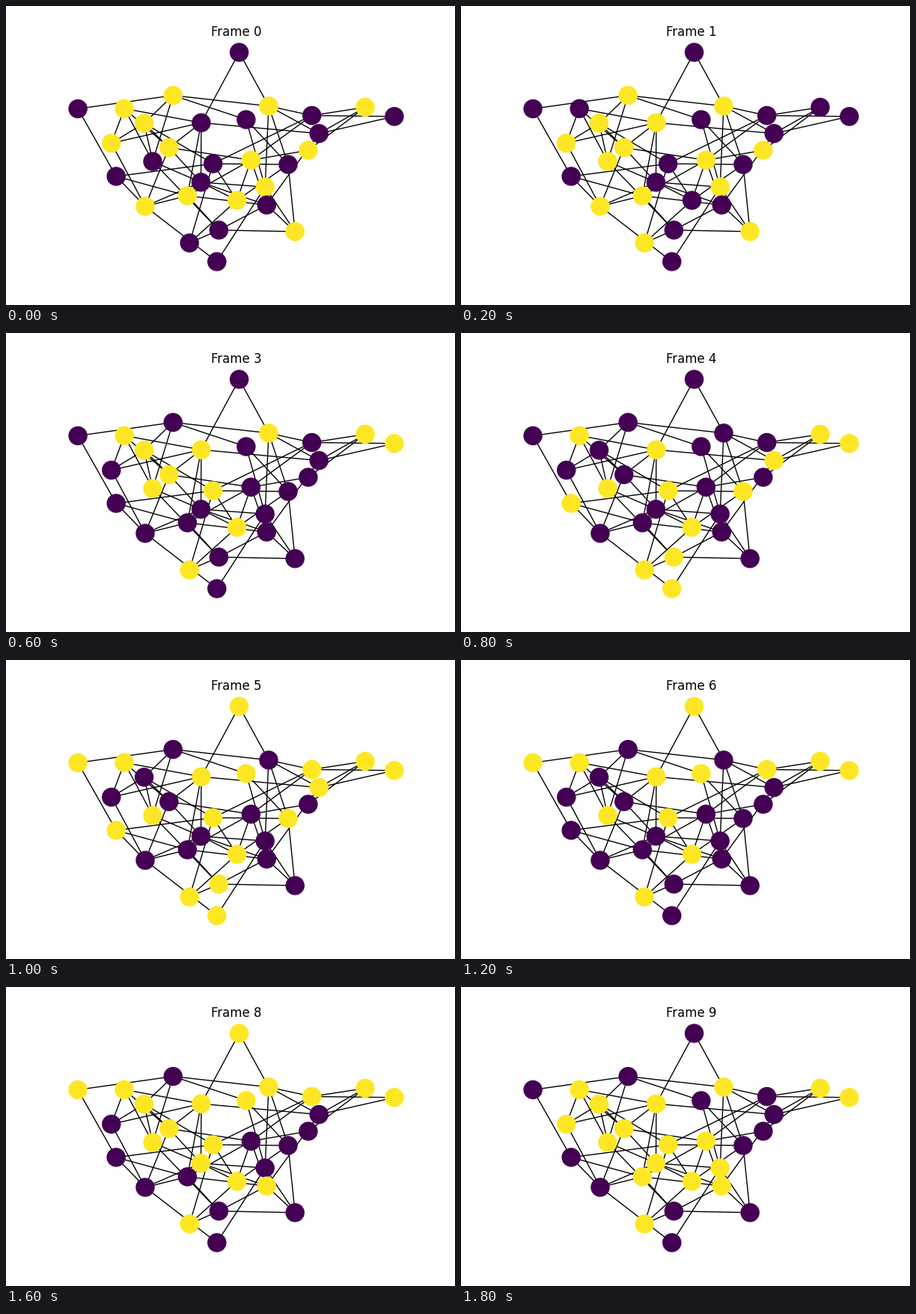
Write a matplotlib script that moves like this. It is 600x400 px and loops after 2000 ms.

```python
import matplotlib.pyplot as plt
from matplotlib.animation import FuncAnimation
from matplotlib.collections import LineCollection

PURPLE, YELLOW = "#440154", "#fde725"
STEPS = 10

# Groups of nodes that glow together: first lit step, lit steps, centres (y down)
WAVES = [
    (2, 9, [(158.2, 137.3), (480, 135.5), (308.6, 260)]),
    (1, 9, [(260.9, 156.2), (196, 208), (245.2, 317)]),
    (7, 7, [(184.6, 156.8), (351, 133.9), (217.8, 189.5)]),
    (5, 4, [(311.6, 62), (96.1, 137.5), (320.9, 152), (408.7, 146.5)]),
    (9, 3, [(140.8, 183.5), (327.4, 206.2), (346.2, 242.1), (242.4, 253.9)]),
    (0, 3, [(223.2, 119.6), (403.9, 193), (186, 268), (386.2, 301.8)]),
    (7, 3, [(260.5, 235.8), (348.3, 266.2)]),
    (4, 2, [(418.2, 170.6), (377, 212), (147.2, 227.9), (284.4, 299.8),
            (281.8, 342)]),
    (2, 8, [(518.9, 147.8), (276.7, 211)]),
]

# Walks through the graph; each pair of neighbours is one edge
WALKS = [
    (17, 10, 25, 29, 6, 17, 7, 9, 3, 0, 13, 6, 8, 0, 4, 17, 11),
    (6, 4, 21, 8, 3, 13, 19, 8, 14, 12, 7, 23, 3, 21, 15, 7, 24, 11, 15, 27,
     19, 25, 16, 3),
    (12, 1, 23, 28, 12, 29, 24, 2, 29, 5, 26, 4),
    (1, 18, 14, 2, 5),
    (23, 22, 14, 16, 26, 22, 16, 19, 21, 22, 20, 26),
    (24, 20, 15),
    (21, 2),
]

nodes = [point for _, _, points in WAVES for point in points]
edges = [(nodes[a], nodes[b]) for walk in WALKS for a, b in zip(walk, walk[1:])]

fig, ax = plt.subplots(figsize=(6, 4), dpi=100)
fig.subplots_adjust(left=0.125, right=0.9, bottom=0.11, top=0.88)
ax.set_xlim(75, 540)
ax.set_ylim(356, 48)
ax.axis("off")

ax.add_collection(LineCollection(edges, colors="black", linewidths=1, zorder=1))
dots = ax.scatter(*zip(*nodes), s=300, linewidths=1, zorder=2)
title = ax.set_title("", fontsize=12, fontfamily="DejaVu Sans")


def update(step):
    colors = []
    for start, span, points in WAVES:
        lit = (step - start) % STEPS < span
        colors += [YELLOW if lit else PURPLE] * len(points)
    dots.set_facecolor(colors)
    dots.set_edgecolor(colors)
    title.set_text(f"Frame {step}")
    return dots, title


anim = FuncAnimation(fig, update, frames=STEPS, interval=200,
                     repeat=True, repeat_delay=0, blit=False)
plt.show()
```
